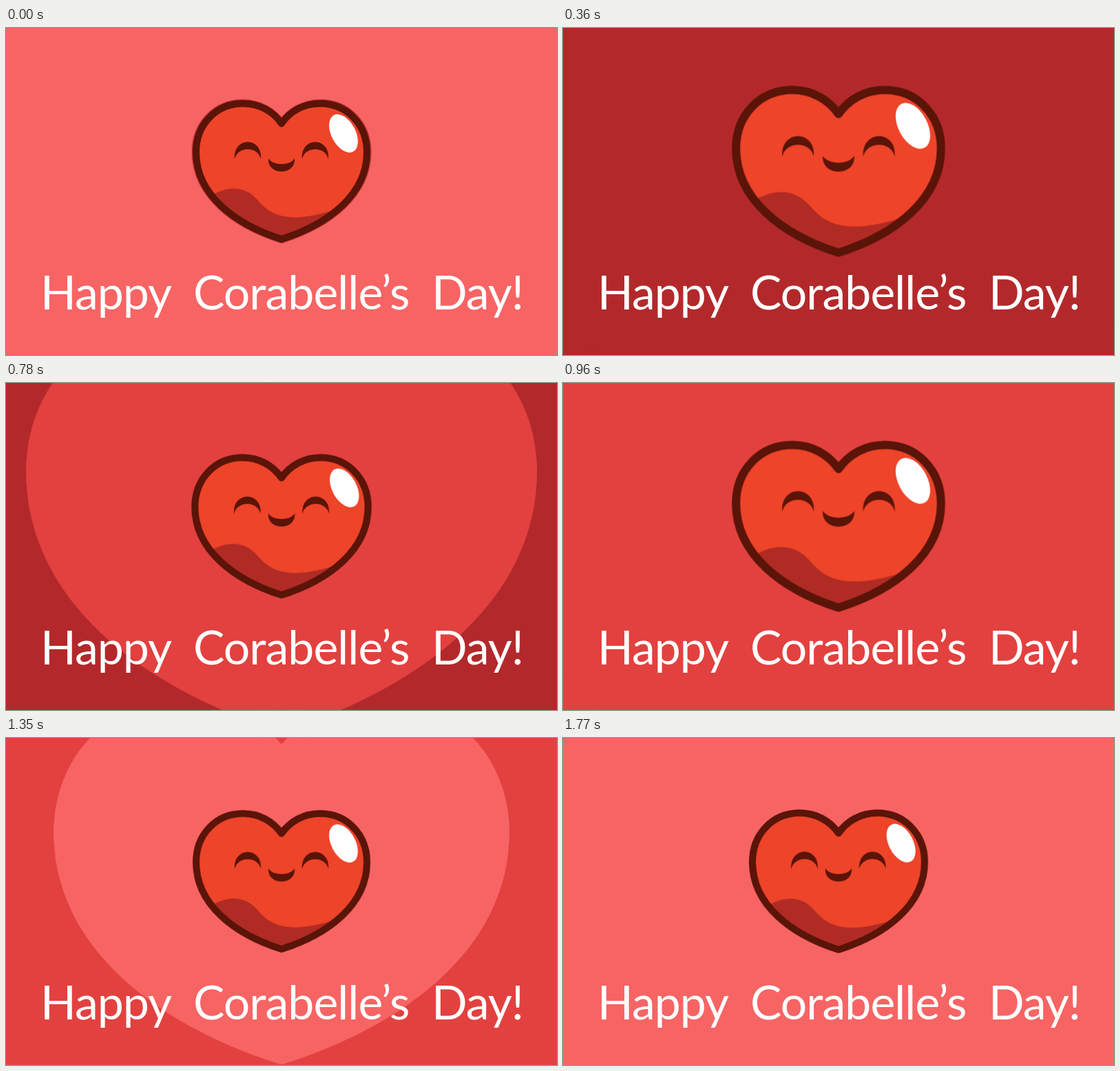
Write an HTML page that moves like this. It is 800x474 px and loops after 1800 ms.

```html
<!DOCTYPE html>
<html lang="en">
<head>
<meta charset="utf-8">
<title>Beating heart card</title>
<style>
  :root { --pink: #f76464; --wine: #b3292b; --red: #e2413f; --line: #5a1408; }
  html, body { margin: 0; width: 100%; height: 100%; overflow: hidden; }
  svg { display: block; width: 800px; height: 474px; animation: ground 1800ms step-end infinite; }

  .wave, .beat { transform-box: view-box; transform-origin: 400px 207.5px; }
  .wave {
    stroke-width: 10;
    animation: grow 600ms linear infinite, tint 1800ms step-end infinite;
  }
  .beat { animation: beat 600ms cubic-bezier(.5, 0, .5, 1) infinite; }
  .line { fill: none; stroke: var(--line); stroke-width: 10; }
  .face { fill: var(--line); }
  text { fill: #fff; font: 68px Lato, "Open Sans", sans-serif; letter-spacing: -1px; }

  @keyframes ground {
    0% { background: var(--pink); }
    33.3333% { background: var(--wine); }
    66.6666%, 100% { background: var(--red); }
  }
  @keyframes tint {
    0% { fill: var(--wine); stroke: var(--wine); }
    33.3333% { fill: var(--red); stroke: var(--red); }
    66.6666%, 100% { fill: var(--pink); stroke: var(--pink); }
  }
  @keyframes grow {
    0% { transform: scale(1); }
    30% { transform: scale(2.865); }
    100% { transform: scale(7.15); }
  }
  @keyframes beat {
    0%, 25% { transform: scale(1); }
    50%, 70% { transform: scale(1.2); }
    100% { transform: scale(1); }
  }
</style>
</head>
<body>
<svg viewBox="0 0 800 474">
  <defs>
    <path id="heart" stroke-linejoin="round" d="M400 138.5
      C388 121 368 109.5 344 109.5 C305 109.5 276 140 276 180 C276 241 331 284 400 306
      C469 284 524 241 524 180 C524 140 495 109.5 456 109.5 C432 109.5 412 121 400 138.5Z"/>
    <path id="eye" d="M332 190 C329 157 373 157 370 190 C366 171 336 171 332 190Z"/>
    <clipPath id="inside"><use href="#heart"/></clipPath>
  </defs>

  <use class="wave" href="#heart"/>

  <g class="beat">
    <use href="#heart" fill="#ee4429"/>
    <path clip-path="url(#inside)" fill="#b12b25"
      d="M295 245 C320 228 347 228 365 249 C390 280 425 281 485 261 V320 H295Z"/>
    <use class="line" href="#heart"/>
    <ellipse rx="17.5" ry="30" fill="#fff" transform="translate(490 152.8) rotate(-28)"/>
    <g class="face">
      <use href="#eye"/>
      <use href="#eye" x="98"/>
      <path d="M381 189 C379 214.5 421 214.5 419 189 C413 200 387 200 381 189Z"/>
    </g>
  </g>

  <text y="408"><tspan x="50">Happy</tspan> <tspan x="272">Corabelle’s</tspan> <tspan x="618">Day!</tspan></text>
</svg>
</body>
</html>
```
